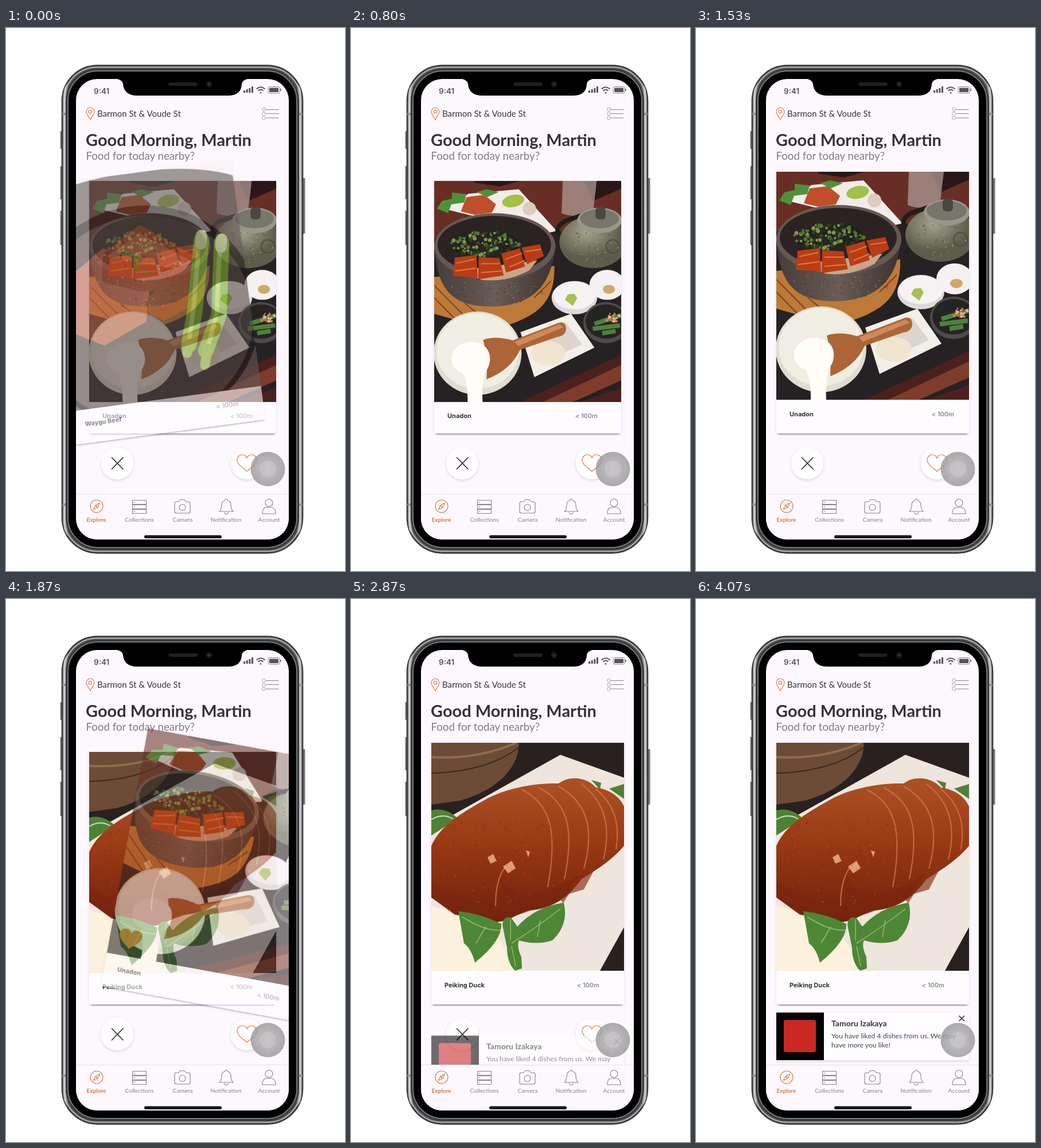
An HTML page for the animation above (4140 ms loop, 591 by 948 pixels).

```html
<!DOCTYPE html>
<html lang="en">
<head>
<meta charset="utf-8">
<title>Food card swipe</title>
<style>
@property --g { syntax: "<number>"; inherits: true; initial-value: 0; }
html, body { margin: 0; width: 100%; height: 100%; overflow: hidden; background: #fff; }
#stage { position: relative; width: 591px; height: 948px; overflow: hidden; }
.layer { position: absolute; left: 0; top: 0; width: 591px; height: 948px; }
.screen { clip-path: inset(89px 98px 55px 122px round 37px); }
text { font-family: Lato, sans-serif; }
.line { fill: none; stroke: #858387; stroke-width: 1.1; stroke-linecap: round; stroke-linejoin: round; }
.hot { stroke: #d9783f; }

/* --g runs from 0 (resting behind) to 1 (in front) */
.card {
  position: absolute;
  left: calc(145px - 5px * var(--g));
  top: calc(267px - 16px * var(--g));
  width: calc(326px + 10px * var(--g));
  height: calc(441px + 16px * var(--g));
  background: #fefcfe;
  border-radius: 0 0 4px 4px;
  box-shadow: 0 4px 3px -3px #666, 0 1px 5px #0000001c;
  transform-origin: 0 0;
  font: 700 11px/14px Inter, sans-serif;
  color: #333;
}
.card svg { display: block; width: 100%; }
.card p, .card b { position: absolute; margin: 0; bottom: calc(24px + 3px * var(--g)); }
.card p { left: 23px; }
.card b { right: calc(41px + var(--shift) * var(--g)); color: #8b898c; font-weight: 600; }
.card, .note, .like { animation: 4140ms linear infinite; }

.beef { --g: 1; --shift: 2px; animation-name: beef; }
.unadon { --shift: -15px; animation-name: unadon; }
.duck { --shift: 2px; animation-name: duck; }
.like { animation-name: like; transform-origin: 36px 368px; }
.note { animation-name: note; }

@keyframes beef {
  0% { transform: translate(-81px, 24px) rotate(-7.6deg); opacity: .6; }
  4.83%, 100% { transform: translate(-165px, 52px) rotate(-15deg); opacity: 0; }
}
@keyframes unadon {
  0%, 21% { --g: 0; animation-timing-function: ease-in-out; }
  27.3% { --g: 1; }
  40.3% { --g: 1; transform: none; opacity: 1; }
  45.17% { --g: 1; transform: translate(107px, -25px) rotate(10.3deg); opacity: .58; }
  50%, 100% { --g: 1; transform: translate(212px, -48px) rotate(20deg); opacity: 0; }
}
@keyframes duck {
  0%, 40.2% { --g: 0; opacity: 0; }
  40.3% { --g: 0; opacity: 1; }
  50.7% { --g: 0; opacity: 1; animation-timing-function: ease-in-out; }
  56.8%, 100% { --g: 1; opacity: 1; }
}
@keyframes like {
  0%, 38.6% { transform: scale(0); }
  40.3%, 100% { transform: none; }
}
@keyframes note {
  0%, 66.4% { transform: translateY(95px); opacity: 0; animation-timing-function: ease-out; }
  73.7%, 100% { transform: none; opacity: 1; }
}
</style>
</head>
<body>
<div id="stage">

<!-- phone body -->
<svg class="layer" viewBox="0 0 591 948">
  <defs>
    <linearGradient id="steel" x2="1" y2="0">
      <stop offset="0" stop-color="#3c3c3f"/><stop offset=".012" stop-color="#d2d2d5"/>
      <stop offset=".026" stop-color="#55565a"/><stop offset=".974" stop-color="#55565a"/>
      <stop offset=".988" stop-color="#d2d2d5"/><stop offset="1" stop-color="#3c3c3f"/>
    </linearGradient>
    <linearGradient id="skin" x2="0" y2="1">
      <stop offset="0" stop-color="#ad5126"/><stop offset=".5" stop-color="#963713"/>
      <stop offset="1" stop-color="#6f210c"/>
    </linearGradient>
    <linearGradient id="stone" x2="1" y2="0">
      <stop offset="0" stop-color="#453c3a"/><stop offset=".5" stop-color="#6b5c55"/>
      <stop offset="1" stop-color="#3b3230"/>
    </linearGradient>
    <radialGradient id="iron" cx=".4" cy=".3">
      <stop offset="0" stop-color="#a4a48c"/><stop offset="1" stop-color="#5c5d4c"/>
    </radialGradient>
    <radialGradient id="touch">
      <stop offset="0" stop-color="#b9b7ba"/><stop offset=".45" stop-color="#b5b3b6"/>
      <stop offset=".5" stop-color="#a6a4a7"/><stop offset="1" stop-color="#969497"/>
    </radialGradient>
    <filter id="soft" x="-30%" y="-30%" width="160%" height="160%">
      <feDropShadow dx="0" dy="2" stdDeviation="2.5" flood-opacity=".14"/>
    </filter>
    <path id="heart" d="M0 14C-7 8-17 2-17-6C-17-12-12-15-8-15C-4-15-1-12 0-9C1-12 4-15 8-15C12-15 17-12 17-6C17 2 7 8 0 14Z"/>
  </defs>
  <g fill="#77787b">
    <rect x="94.500" y="180" width="4" height="31" rx="1"/><rect x="94.500" y="241" width="4" height="58" rx="1"/>
    <rect x="94.500" y="319" width="4" height="60" rx="1"/><rect x="517" y="262" width="4.500" height="97" rx="1"/>
  </g>
  <rect x="97.500" y="65" width="420" height="852" rx="62" fill="url(#steel)" stroke="#29292b" stroke-width="1.500"/>
  <rect x="101" y="68.500" width="413" height="845" rx="58" fill="none" stroke="#c9c9cc" stroke-width="1.500"/>
  <rect x="104" y="71" width="407" height="840" rx="56" fill="#39393c"/>
  <rect x="108" y="75" width="399" height="832" rx="52" fill="#000" stroke="#77787b" stroke-width="2"/>
  <path d="M98 150h6M511 150h6M98 832h6M511 832h6" stroke="#909093" stroke-width="4"/>
  <rect x="122" y="89" width="371" height="804" rx="37" fill="#fdf8fd"/>
  <path d="M187 88Q203 89 204 98Q206 118 229 118H387Q410 118 411 98Q412 89 428 88Z"/>
  <rect x="283" y="95" width="51" height="6" rx="3" fill="#202022"/>
  <circle cx="354" cy="98" r="5.500" fill="#17171c"/><circle cx="354" cy="98" r="2" fill="#34343e"/>

  <text x="153" y="115" font-size="13.500" font-weight="600" fill="#555" style="font-family:Inter,sans-serif">9:41</text>
  <g fill="#55545a">
    <path d="M414 109h3v4h-3zM418.700 107h3v6h-3zM423.400 105h3v8h-3zM428 102h3v11h-3z"/>
    <rect x="459" y="104.500" width="16" height="7.500" rx="1"/><rect x="478" y="106" width="1.500" height="4"/>
  </g>
  <rect x="457" y="102.500" width="20" height="11.500" rx="2.500" fill="none" stroke="#888"/>
  <path d="M436.500 106.500Q444 100 451.500 106.500M439.500 109.500Q444 105.500 448.500 109.500M443 112.500L444 113.500L445 112.500" fill="none" stroke="#55545a" stroke-width="2"/>

  <path class="line hot" stroke-width="1.400" d="M147 160C143 153 140 150 140 146A7 7 0 0 1 154 146C154 150 151 153 147 160Z"/>
  <circle class="line hot" cx="147" cy="146" r="2.800"/>
  <text x="159" y="155" font-size="15" fill="#38363a">Barmon St &amp; Voude St</text>
  <g class="line"><path d="M454 142.500H475M454 149.500H475M454 157H475"/>
    <g stroke-width=".7"><circle cx="449.500" cy="142" r="3"/><circle cx="449.500" cy="149.500" r="3"/><circle cx="449.500" cy="157" r="3"/></g></g>
  <text x="139" y="206" font-size="29" font-weight="700" fill="#343236">Good Morning, Martin</text>
  <text x="139.500" y="230" font-size="18.700" fill="#807d82">Food for today nearby?</text>

  <g fill="#fffdff" filter="url(#soft)"><circle cx="194" cy="760" r="28"/><circle cx="420" cy="760" r="28"/></g>
  <path d="M184.500 750L204 770M204 750L184.500 770" stroke="#333" stroke-width="1.700" stroke-linecap="round"/>
  <use href="#heart" x="420" y="760" class="line hot" stroke-width="1.500"/>
</svg>

<!-- cards -->
<div class="layer screen">
  <div class="card duck">
    <svg viewBox="0 0 336 398">
      <path fill="#292120" d="M0 0H336V398H0Z"/>
      <path fill="#6c4c36" d="M0 0H153C152 48 110 84 50 101L0 108Z"/>
      <path fill="none" stroke="#3c271c" stroke-width="2" d="M0 53Q100 50 152 8"/>
      <path fill="none" stroke="#916c4f" stroke-width="4" d="M0 25Q80 30 148 0"/>
      <path fill="#eee5dd" d="M0 147L225 21L336 61V322L294 398H0Z"/>
      <path fill="#fbf1dc" d="M0 285L100 310L150 398H0Z"/>
      <path fill="#4f8135" d="M0 118Q25 112 46 132L0 162ZM279 65L296 70L294 82ZM310 80L336 72V98Z"/>
      <path fill="none" stroke="#cddcbd" stroke-width="2" d="M0 134Q20 122 38 133"/>
      <path fill="#a66c58" d="M215 262L285 220L266 256L240 264L230 280Z"/>
      <path fill="url(#skin)" d="M0 180C18 140 60 119 100 96C140 76 190 70 222 71C240 57 270 59 287 78C312 82 328 94 336 111V180C318 202 290 221 262 238C240 268 215 289 170 293C148 299 122 320 104 310C74 302 65 304 42 300L0 270Z"/>
      <path fill="#7c260f" opacity=".55" d="M0 240Q60 286 118 280Q128 258 117 230Q130 272 205 258L260 230L232 270L160 298L104 310L40 300L0 270Z"/>
      <path fill="none" stroke="#cf7b4d" stroke-width="2.200" opacity=".75" d="M158 82C205 105 222 150 203 252M187 78C238 104 250 150 232 238M222 76C272 105 285 150 266 220M262 72C305 105 313 150 300 204M286 80C325 112 328 150 322 186M128 218Q112 240 112 285"/>
      <path fill="#f0b088" opacity=".85" d="M98 200L108 194L114 207L103 211ZM125 216L140 206L147 219L134 228ZM165 188L169 200L172 190Z"/>
      <g data-dots="150 125 200 115 85 1 #6b210c,#b85c2d"></g>
      <path fill="#4d8736" d="M47 294Q85 298 122 316Q124 345 76 384Q70 360 57 350ZM124 318Q125 302 139 305L150 321Q180 287 231 279Q240 318 211 345Q183 354 153 345Q148 354 157 374L158 394L146 398Q132 384 132 358Z"/>
      <path fill="none" stroke="#95b96c" stroke-width="1.500" d="M54 304Q95 330 121 327M78 350L95 321M140 350Q180 325 225 290M185 339L190 310M140 355L147 390M138 308V345"/>
    </svg>
    <p>Peiking Duck</p><b>&lt; 100m</b>
  </div>

  <div class="card unadon">
    <svg viewBox="0 0 336 398">
      <path fill="#262123" d="M0 0H336V398H0Z"/>
      <path fill="#682e25" d="M0 0H336V85L220 92L150 15L0 105Z"/>
      <path fill="#2a1719" d="M72 0H155L118 10L72 3ZM270 0H336V14L286 36Z"/>
      <path fill="#ac9995" opacity=".75" d="M231 0H292L286 52Q256 70 229 58Z"/>
      <path fill="#f1ece9" d="M17 50L62 23L152 15L220 90L185 98L90 68Z"/>
      <path fill="#bf4f2a" d="M48 55L58 29L90 25L111 42L104 57L73 61Z"/>
      <path fill="#4f913b" d="M5 50L14 36L32 32L32 21L58 24L54 39L31 42L25 58ZM76 20L94 15L116 20L95 29Z"/>
      <ellipse cx="142" cy="36" rx="20" ry="11" fill="#a5bf4a" transform="rotate(-12 142 36)"/>
      <circle cx="171" cy="50" r="12" fill="#ddcbbf"/>

      <path fill="none" stroke="#201e1d" stroke-width="8" d="M265 102Q237 109 224 94Q216 84 235 72L268 61"/>
      <ellipse cx="286" cy="110" rx="61" ry="47" fill="url(#iron)"/>
      <g data-dots="60 288 116 46 33 1.500 #777963,#a0a18a,#535543"></g>
      <ellipse cx="297" cy="71" rx="40" ry="23" fill="#98978a"/>
      <ellipse cx="297" cy="68" rx="35" ry="17" fill="#77766a"/>
      <rect x="290" y="47" width="18" height="22" rx="6" fill="#4a4741"/>
      <circle cx="321" cy="118" r="12" fill="none" stroke="#4c4d3f" stroke-width="2"/>

      <path fill="#bd7938" d="M0 173L216 153Q218 211 180 237Q140 263 95 266L0 239Z"/>
      <path stroke="#79431f" stroke-width="2" d="M0 188L75 264M0 210L42 253M55 220L110 264M180 210L210 180"/>
      <path fill="url(#stone)" d="M0 112C4 194 30 227 105 226C184 224 213 180 218 112Z"/>
      <ellipse cx="109" cy="118" rx="109" ry="60" fill="#665951"/>
      <ellipse cx="108" cy="115" rx="102" ry="52" fill="#2a2322"/>
      <g data-dots="110 109 197 88 25 1 #96867a,#352b29"></g>
      <path fill="#c9a48d" d="M45 161L185 143L171 161Q130 183 86 178Z"/>
      <g data-dots="150 92 113 61 23 3.500 #29411f,#577836,#18221b,#82974e"></g>
      <path fill="#b83d17" d="M37 138L76 133L78 174L34 171ZM80 137L117 139L125 170L79 177ZM121 131L154 121L163 154L129 165ZM157 120L190 114L197 135L167 150Z"/>
      <path fill="none" stroke="#e47935" stroke-width="2" d="M40 148L73 141M38 162L75 157M84 149L118 149M84 165L121 162M128 141L158 130M135 155L163 143M164 127L192 123"/>

      <ellipse cx="252" cy="210" rx="41" ry="30" fill="#dedadb"/><ellipse cx="252" cy="206" rx="38" ry="25" fill="#f6f2f3"/>
      <path fill="#a9be53" d="M235 214L240 204L252 203L257 211L249 225Z"/>
      <ellipse cx="311" cy="187" rx="32" ry="27" fill="#f5f0f1"/><ellipse cx="314" cy="195" rx="11" ry="8" fill="#cfaa67"/>
      <ellipse cx="309" cy="255" rx="41" ry="37" fill="#514a49"/><ellipse cx="309" cy="253" rx="37" ry="31" fill="#252424"/>
      <path stroke="#4f813d" stroke-width="8" d="M288 257L336 242M285 266L334 260M302 274L326 270"/>
      <g data-dots="20 320 246 16 9 3 #d77e4c,#edb08c"></g>

      <path fill="#f2eee8" d="M155 272L246 239L288 300L180 353Z"/>
      <path fill="#dad5cf" d="M172 281L236 254L266 294L190 329Z"/>
      <ellipse cx="205" cy="310" rx="31" ry="22" fill="#f1e5cf"/>
      <path fill="#7e3c2b" d="M180 398L336 324V359L249 398Z"/>
      <path fill="#4c211d" d="M154 398L336 313V331L195 398ZM263 398L336 372V398Z"/>
      <ellipse cx="78" cy="310" rx="79" ry="75" fill="#deddd1"/>
      <ellipse cx="78" cy="306" rx="74" ry="68" fill="#f0eee2"/>
      <path fill="#ad6537" d="M88 286Q110 278 141 287L224 255Q237 252 237 267Q236 279 220 281L154 304Q138 340 94 357Q97 320 88 286Z"/>
      <path fill="#d18a56" d="M144 289L225 258L233 263L151 297Z"/>
      <path fill="#fffdf8" d="M51 345C20 337 26 292 65 290C105 289 107 328 91 344Q85 367 87 398H60Q61 365 51 345Z"/>
      <use class="like" href="#heart" fill="#d47830" transform="translate(36 368) scale(1.17)" style="animation:none" id="liked"/>
    </svg>
    <p>Unadon</p><b>&lt; 100m</b>
  </div>

  <div class="card beef">
    <svg viewBox="0 0 336 398">
      <path fill="#f8f2f3" d="M0 0H336V398H0Z"/>
      <path fill="#5d5655" d="M0 20Q100-8 213 0Q290 6 336 27V398H0Z"/>
      <ellipse cx="150" cy="250" rx="202" ry="193" fill="#201b1b"/>
      <ellipse cx="150" cy="255" rx="190" ry="180" fill="#50433f"/>
      <path fill="#b9654b" d="M30 165L95 123L176 163L153 260L75 292L22 262Z"/>
      <path fill="#a3482d" d="M93 133L164 91L263 166L232 211L150 207L86 181Z"/>
      <path fill="#c77c61" d="M100 138L161 105L245 166L216 176Z" opacity=".6"/>
      <path fill="#93502c" d="M155 224L188 198L239 211L227 247L184 263L160 247Z"/>
      <g data-dots="80 145 180 88 65 2 #c86744,#7a3828,#df9275"></g>
      <path fill="none" stroke="#4d7630" stroke-width="5" d="M127 134L159 151L146 164L171 178M148 139L143 160"/>
      <g fill="none" stroke-linecap="round">
        <path stroke="#78ad2f" stroke-width="27" d="M267 132L240 250L221 310M301 142L280 265L249 324"/>
        <path stroke="#aed35a" stroke-width="8" d="M263 132L238 246L218 318M298 142L276 263L246 336"/>
        <path stroke="#dce7a6" stroke-width="20" d="M268 124L265 138M302 135L299 148"/>
        <path stroke="#83ae3d" stroke-width="17" d="M222 308L216 324M252 320L244 349"/>
      </g>
    </svg>
    <p>Waygu Beef</p><b>&lt; 100m</b>
  </div>
</div>

<!-- notification, tab bar and touch point -->
<svg class="layer screen" viewBox="0 0 591 948">
  <g class="note">
    <rect x="140" y="722" width="336" height="83" fill="#fffdff" filter="url(#soft)"/>
    <rect x="140" y="722" width="83" height="83" fill="#050304"/>
    <rect x="153" y="735" width="56" height="56" rx="3" fill="#c92825"/>
    <text x="236" y="746" font-size="14" font-weight="700" fill="#343236">Tamoru Izakaya</text>
    <text font-size="12.200" fill="#454247"><tspan x="236" y="767">You have liked 4 dishes from us. We may</tspan><tspan x="236" y="783">have more you like!</tspan></text>
    <path d="M458.500 727.500L468 737M468 727.500L458.500 737" stroke="#333" stroke-width="1.700"/>
  </g>
  <rect x="122" y="814" width="371" height="79" fill="#fdf8fd"/>
  <path d="M122 813.500H493" stroke="#e6e1e6"/>
  <g class="line">
    <g class="hot"><circle cx="158" cy="835" r="11"/><path d="M163.500 829.500L160 837L152.500 840.500L156 833Z"/><circle cx="158" cy="835" r="1"/></g>
    <path d="M220.500 824.500H244.500V831.500H220.500ZM220.500 832.500H244.500V839.500H220.500ZM220.500 840.500H244.500V847.500H220.500ZM223 828h2M223 836h2M223 844h2"/>
    <path d="M297 827H301L304 823.500H311L314 827H318Q321 827 321 830V844Q321 847 318 847H297Q294 847 294 844V830Q294 827 297 827Z"/>
    <circle cx="307.500" cy="837" r="5.500"/>
    <path d="M372 844Q376 840 376 833Q376 826 382 824.500A2 2 0 0 1 386 824.500Q392 826 392 833Q392 840 396 844ZM380.500 846Q384 852 387.500 846"/>
    <circle cx="458.500" cy="829" r="6.500"/><path d="M447 848V845Q448 837 454 837H463Q469 838 470 845V848Z"/>
  </g>
  <g font-size="10.400" fill="#858287" text-anchor="middle">
    <text x="157.500" y="862" fill="#d9783f" font-weight="700" font-size="10">Explore</text>
    <text x="232.500" y="862">Collections</text><text x="308" y="862">Camera</text>
    <text x="383.500" y="862">Notification</text><text x="458.500" y="862">Account</text>
  </g>
  <rect x="241" y="885.500" width="135" height="5.500" rx="2.750" fill="#17161a"/>
  <circle cx="456.500" cy="770" r="30" fill="url(#touch)" opacity=".8"/>
</svg>
</div>

<script>
// Seeded speckles: count, centre x y, radius x y, dot size, colours
let seed = 7;
const rnd = () => (seed = seed * 16807 % 2147483647) / 2147483647;
for (const group of document.querySelectorAll("[data-dots]")) {
  const parts = group.dataset.dots.split(" ");
  const [count, cx, cy, rx, ry, size] = parts.map(Number);
  const colours = parts[6].split(",");
  for (let i = 0; i < count; i++) {
    const angle = rnd() * Math.PI * 2, reach = Math.sqrt(rnd());
    const dot = document.createElementNS("http://www.w3.org/2000/svg", "circle");
    dot.setAttribute("cx", cx + Math.cos(angle) * reach * rx);
    dot.setAttribute("cy", cy + Math.sin(angle) * reach * ry);
    dot.setAttribute("r", size * (.5 + rnd() * .5));
    dot.setAttribute("fill", colours[i % colours.length]);
    group.append(dot);
  }
}
// The pop wraps the placed heart so both transforms apply.
const liked = document.getElementById("liked");
const pop = document.createElementNS("http://www.w3.org/2000/svg", "g");
pop.setAttribute("class", "like");
liked.removeAttribute("class");
liked.replaceWith(pop);
pop.append(liked);
</script>
</body>
</html>
```
